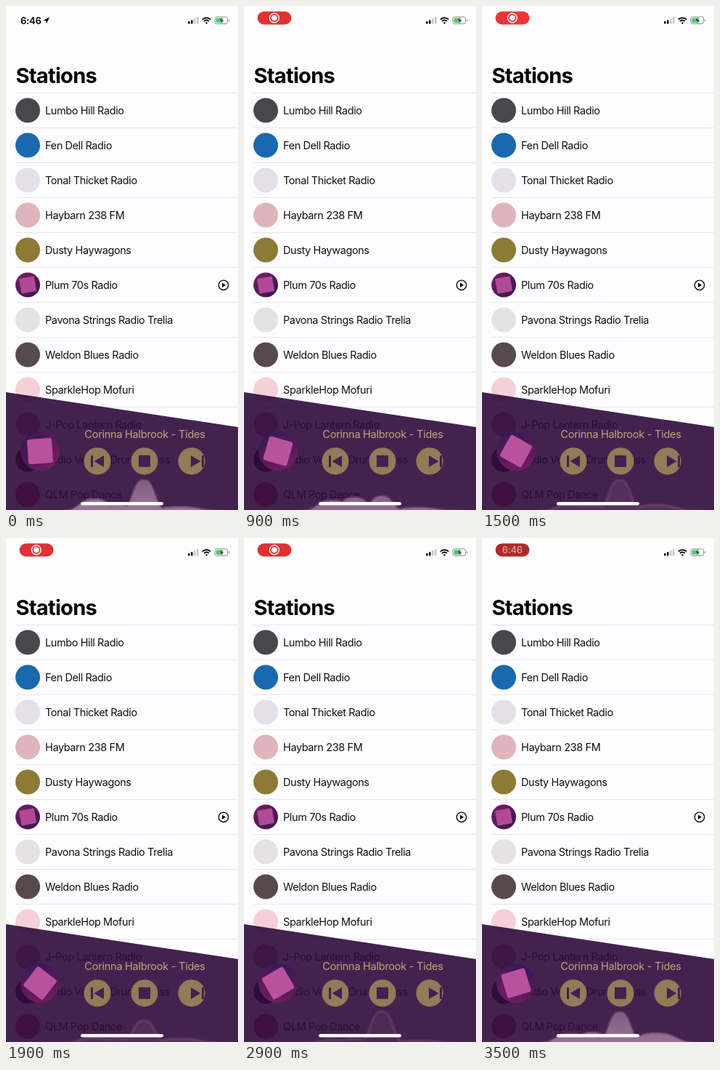
An HTML page that plays this animation: 320x693 px, repeating every 3.6 s.

```html
<!DOCTYPE html>
<html lang="en">
<head>
<meta charset="utf-8">
<title>Stations</title>
<style>
  html, body { margin: 0; width: 100%; height: 100%; overflow: hidden; background: #fdfcfe; }
  svg { display: block; width: 320px; height: 693px; }
  text { font-family: Inter, "Liberation Sans", sans-serif; font-size: 14.5px; letter-spacing: -.4px; }
</style>
</head>
<body>
<svg viewBox="0 0 320 693">
  <defs>
    <linearGradient id="neon" x1="0" y1="0" x2="1" y2="1">
      <stop offset="0" stop-color="#7a1d68"/>
      <stop offset=".5" stop-color="#561a58"/>
      <stop offset="1" stop-color="#2a1a55"/>
    </linearGradient>
    <linearGradient id="glow" gradientUnits="userSpaceOnUse" x1="0" y1="648" x2="0" y2="693">
      <stop offset="0" stop-color="#b894b4"/>
      <stop offset="1" stop-color="#f4c8de"/>
    </linearGradient>
    <filter id="soft" x="-20%" y="-20%" width="140%" height="140%"><feGaussianBlur stdDeviation="1.2"/></filter>
  </defs>
  <rect width="320" height="693" fill="#fdfcfe"/>

  <!-- status bar -->
  <g id="clock">
    <text x="20" y="24.5" style="font-size:13px;font-weight:600;letter-spacing:-.2px">6:46</text>
    <path d="M60 15.5l-8.5 4.2 4 .5.4 4z"/>
  </g>
  <g id="pill">
    <rect id="pillBack" x="18.5" y="7.5" width="47" height="18" rx="9"/>
    <g id="record">
      <circle cx="41.8" cy="16.4" r="6.4" fill="none" stroke="#fff" stroke-width="1.4"/>
      <circle cx="41.8" cy="16.4" r="3.8" fill="#fff"/>
    </g>
    <text id="pillTime" x="41.8" y="21" fill="#e5a3a0" text-anchor="middle" style="font-size:13px;font-weight:500;letter-spacing:-.2px">6:46</text>
  </g>
  <g fill="#111">
    <rect x="251" y="21" width="2.6" height="3.5" rx=".7"/>
    <rect x="255" y="19.2" width="2.6" height="5.3" rx=".7"/>
    <rect x="259" y="17" width="2.6" height="7.5" rx=".7" fill="#c8c8ca"/>
    <rect x="263" y="15" width="2.6" height="9.5" rx=".7" fill="#c8c8ca"/>
  </g>
  <g fill="none" stroke="#111" stroke-width="2">
    <path d="M270.8 18.6a8 8 0 0 1 11.4 0M273.1 21a4.8 4.8 0 0 1 6.8 0"/>
    <path d="M276.5 25l-1.7-2a2.4 2.4 0 0 1 3.4 0z" fill="#111" stroke="none"/>
  </g>
  <rect x="288" y="15" width="17.5" height="9.5" rx="2.6" fill="none" stroke="#8c8c8e"/>
  <path d="M307 18v3.6q1.4-.5 1.4-1.8t-1.4-1.8z" fill="#8c8c8e"/>
  <rect x="289.6" y="16.6" width="10" height="6.3" rx="1.3" fill="#45cf64"/>
  <path d="M298.4 14.6l-4.3 5.7h2.7l-1.1 4.6 4.5-5.9h-2.8z" fill="#111" stroke="#fdfcfe" stroke-width=".5"/>

  <text x="13.5" y="106" style="font-size:29px;font-weight:700;letter-spacing:-.7px">Stations</text>
  <g id="rows"></g>
  <circle cx="300" cy="383.8" r="6.7" fill="none" stroke="#111" stroke-width="1.4"/>
  <path d="M298 380.6v6.4l5.2-3.2z" fill="#111"/>

  <!-- player -->
  <path d="M0 531L320 579V693H0z" fill="#300a3c" fill-opacity=".9"/>
  <g filter="url(#soft)">
    <path id="fill" fill="url(#glow)"/>
    <path id="edge" fill="none" stroke="#c277a8" stroke-width="2" stroke-opacity=".3"/>
  </g>
  <g id="disc">
    <circle r="27" fill="url(#neon)"/>
    <rect x="-17" y="-17" width="34" height="34" rx="3" fill="#b8529c"/>
  </g>
  <text x="191.5" y="593.5" text-anchor="middle" fill="#c3a37b" style="letter-spacing:-.25px">Corinna Halbrook - Tides</text>
  <g fill="#968059" fill-opacity=".95">
    <circle cx="126" cy="625.8" r="18.6"/>
    <circle cx="191" cy="625.8" r="18.6"/>
    <circle cx="256" cy="625.8" r="18.6"/>
  </g>
  <g fill="#43204e">
    <path d="M117 618h3v16h-3zM135 618v16l-13.5-8z"/>
    <path d="M183 617.8h16v16h-16z"/>
    <path d="M262 618h3v16h-3zM247 618v16l13.5-8z" transform="translate(8)"/>
  </g>
  <rect x="103" y="682" width="114" height="4.4" rx="2.2" fill="#fff"/>
</svg>
<script>
const $ = id => document.getElementById(id);
const LOOP = 3600;

const stations = [
  ["Lumbo Hill Radio", "#48484c"],
  ["Fen Dell Radio", "#1a68ad"],
  ["Tonal Thicket Radio", "#e3e0ea"],
  ["Haybarn 238 FM", "#dfb4ba"],
  ["Dusty Haywagons", "#8c7a35"],
  ["Plum 70s Radio", "url(#neon)"],
  ["Pavona Strings Radio Trelia", "#e4e2e3"],
  ["Weldon Blues Radio", "#57494c"],
  ["SparkleHop Mofuri", "#f5d0d8"],
  ["J-Pop Lantern Radio", "#b88a9c"],
  ["Radio Velmor Drum n Bass", "#2a2430"],
  ["QLM Pop Dance", "#b8485e"]
];
$("rows").innerHTML = stations.map(([name, color], i) => {
  const y = 143.5 + 48 * i;
  return `<path d="M13 ${y - 24}H320" stroke="#e7e6e9"/>
    <circle cx="30" cy="${y}" r="17" fill="${color}"/>
    <text x="54" y="${y + 5.5}" fill="#111">${name}</text>`;
}).join("") +
  '<rect x="19.5" y="373" width="21" height="21" rx="2" fill="#b04a96" transform="rotate(-10 30 383.5)"/>';

// Hump centres and widths, then [time, four heights, fill opacity]
const humps = [[122, 24], [152, 22], [190, 18], [240, 32]];
const poses = [
  [0, 16, 8, 42, 5, .5],
  [500, 8, 14, 44, 6, .5],
  [900, 14, 18, 20, 4, .45],
  [1500, 8, 7, 42, 8, .1],
  [2400, 5, 5, 16, 2, .08],
  [2900, 4, 5, 43, 3, .06],
  [3500, 12, 14, 42, 13, .48]
];
const clamp = v => Math.max(0, Math.min(1, v));
const mix = (a, b, u) => a + (b - a) * u;

function poseAt(t) {
  const n = poses.findIndex(p => p[0] > t);
  if (n < 0) return poses[poses.length - 1];
  const a = poses[n - 1], b = poses[n];
  const u = (t - a[0]) / (b[0] - a[0]);
  return a.map((v, i) => mix(v, b[i], u));
}

function drawWave(t) {
  const pose = poseAt(t);
  const points = [];
  for (let x = 80; x <= 300; x += 2) {
    // The tallest rounded hump wins, so neighbours overlap like domes
    const h = Math.max(...humps.map(([c, w], i) =>
      pose[i + 1] * Math.exp(-(Math.abs((x - c) / w) ** 3))));
    points.push(`${x} ${(694 - h).toFixed(2)}`);
  }
  const line = "M" + points.join("L");
  $("edge").setAttribute("d", line);
  $("fill").setAttribute("d", line + "V694H80z");
  $("fill").setAttribute("opacity", pose[5]);
}

function drawPill(t) {
  const on = t >= 100;
  $("clock").style.display = on ? "none" : "";
  $("pill").style.display = on ? "" : "none";
  const swap = clamp((t - 3100) / 400);
  const pulse = (1 + Math.cos(2 * Math.PI * t / 1000)) / 2;
  const r = mix(234 - 12 * pulse, 174, swap);
  const g = mix(54 - 4 * pulse, 42, swap);
  $("pillBack").setAttribute("fill", `rgb(${r},${g},${g})`);
  $("record").setAttribute("opacity", 1 - swap);
  $("pillTime").setAttribute("opacity", swap);
}

function frame(now) {
  const t = Math.floor(now % LOOP / 100) * 100;
  $("disc").setAttribute("transform", `translate(47 612) rotate(${176 + t * .022})`);
  drawWave(t);
  drawPill(t);
  requestAnimationFrame(frame);
}
frame(0);
</script>
</body>
</html>
```
